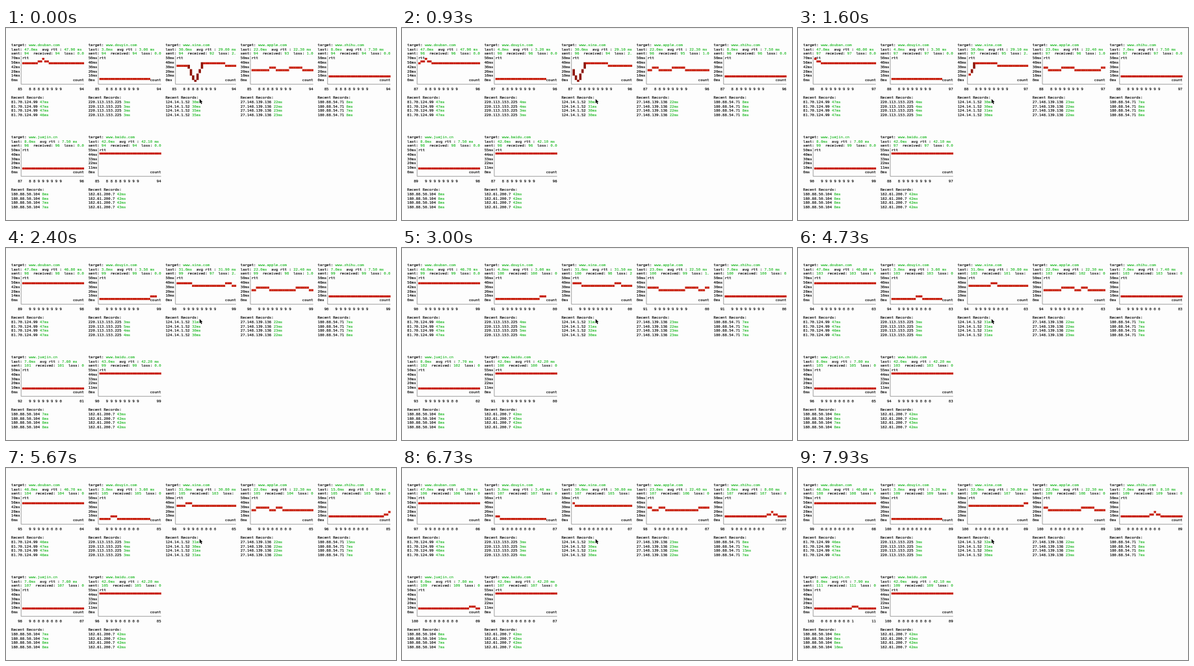
Write an HTML page with a canvas that moves like this. It is 600 px wide and 296 px high and loops after 8000 ms.

```html
<!DOCTYPE html>
<html lang="en">
<head>
<meta charset="utf-8">
<title>Ping dashboard</title>
<style>
  html, body { margin: 0; width: 100%; height: 100%; overflow: hidden; background: #fdfdfd; }
  canvas { display: block; width: 600px; height: 296px; }
</style>
</head>
<body>
<canvas id="screen"></canvas>
<script>
const LOOP = 8000, PERIOD = 550, POINTS = 10;
const CELL_W = 3.392, ROW_H = 6.76, LEFT = 8, TOP = 25.9;
const FONT_SIZE = CELL_W / 0.602;
const BAR_H = 3.2, BAR_SHIFT = 1.4;
const BLACK = '#161616', GREEN = '#2fbe35', RED = '#c8200f', DARK_RED = '#8e1408', AXIS = '#777';

// Each sample is rtt, sometimes plus jitter; bumps are { from, count, rtt }.
const bump = (from, count, rtt) => ({ from, count, rtt });
const targets = [
  { host: 'www.douban.com', ip: '81.70.124.99', col: 0, max: 70, phase: 0.45,
    rtt: 47, jitter: -1, bumps: [bump(88, 1, 59)] },
  { host: 'www.douyin.com', ip: '220.113.153.225', col: 35,
    rtt: 3, jitter: 1, bumps: [bump(98, 1, 5)] },
  { host: 'www.sina.com', ip: '124.14.1.52', col: 70, width: 27, lost: 2,
    rtt: 30, jitter: 1, bumps: [bump(88, 1, 0), bump(89, 4, 35), bump(98, 1, 32), bump(109, 1, 32)] },
  { host: 'www.apple.com', ip: '27.148.139.136', col: 104, lost: 1,
    rtt: 22, bumps: [bump(88, 1, 23), bump(91, 2, 23), bump(97, 2, 23), bump(100, 1, 23), bump(106, 2, 23)] },
  { host: 'www.zhihu.com', ip: '180.88.54.71', col: 139,
    rtt: 7, jitter: 1, bumps: [bump(105, 1, 15)] },
  { host: 'www.juejin.cn', ip: '180.88.50.104', col: 0, row: 21, start: 96,
    rtt: 8, jitter: -1, bumps: [bump(108, 1, 10)] },
  { host: 'www.baidu.com', ip: '182.61.200.7', col: 35, row: 21, max: 55,
    rtt: 42, jitter: 1 },
].map(t => ({ row: 0, max: 50, phase: 0.88, width: 28, lost: 0, start: 94, jitter: 0, bumps: [], ...t }));

const canvas = document.getElementById('screen');
const ctx = canvas.getContext('2d');
const ratio = window.devicePixelRatio || 1;
canvas.width = 600 * ratio;
canvas.height = 296 * ratio;

const cellX = col => LEFT + col * CELL_W;
const rowY = row => TOP + row * ROW_H;

function noise(n, seed) {
  const x = Math.sin(n * 12.9898 + (seed + 1) * 78.233) * 43758.5453;
  return x - Math.floor(x);
}

function sample(t, n) {
  const hit = t.bumps.find(b => n >= b.from && n < b.from + b.count);
  if (hit) return hit.rtt;
  return t.rtt + (noise(n, t.col + t.row) < 0.3 ? t.jitter : 0);
}

function text(col, row, string, color = BLACK) {
  ctx.save();
  ctx.translate(cellX(col), rowY(row) + 2.05);
  ctx.scale(0.1, 0.1);
  ctx.fillStyle = ctx.strokeStyle = color;
  ctx.lineWidth = 1.8;
  ctx.fillText(string, 0, 0);
  ctx.strokeText(string, 0, 0);
  ctx.restore();
}

// Labels and values alternate, and the line is cut at the panel edge.
function line(t, row, ...parts) {
  let used = 0;
  parts.forEach((part, i) => {
    const shown = String(part).slice(0, Math.max(0, t.width + 5 - used));
    text(t.col + used, t.row + row, shown, i % 2 ? GREEN : BLACK);
    used += shown.length;
  });
}

function drawAxes(t, first, last) {
  const right = t.col + 5 + t.width;
  for (let i = 0; i <= 5; i++) text(t.col, t.row + 3 + i, t.max / 5 * (5 - i) + 'ms');

  const x = cellX(t.col + 4.5), y = rowY(t.row + 9);
  ctx.strokeStyle = AXIS;
  ctx.lineWidth = 0.7;
  ctx.beginPath();
  ctx.moveTo(x, rowY(t.row + 2.5));
  ctx.lineTo(x, y);
  ctx.lineTo(cellX(right), y);
  ctx.stroke();

  text(t.col + 5, t.row + 3, 'rtt');
  text(right - 5, t.row + 8, 'count');

  const twoDigits = n => String(n % 100).padStart(2, '0');
  text(t.col + 5 - String(first).length, t.row + 10, String(first));
  for (let n = first + 1; n < last; n++) {
    text(t.col + 6 + 2 * (n - first), t.row + 10, twoDigits(n)[0]);
  }
  text(right - 2, t.row + 10, twoDigits(last));
}

// Levels count half rows downwards from the top of the plot.
function drawPlot(t, values) {
  const levels = values.map(v => v ? 10 - Math.floor(v * 11 / t.max) : 11);
  const levelY = level => rowY(t.row + 3 + Math.floor(level / 2)) + (level % 2 ? BAR_SHIFT : -BAR_SHIFT);
  const levelAt = cell => {
    const inside = Math.min(t.width - 1, Math.max(0, cell));
    const position = (inside + 28 - t.width) / 3;
    const i = Math.min(POINTS - 2, Math.floor(position));
    return Math.round(levels[i] + (levels[i + 1] - levels[i]) * (position - i));
  };
  for (let cell = 0; cell < t.width; cell++) {
    const level = levelAt(cell);
    if (level >= 10 && cell >= t.width - 5) continue;   // hidden by "count"
    const bottom = Math.max(level, levelAt(cell - 1) - 1, levelAt(cell + 1) - 1);
    ctx.fillStyle = bottom > level || level === 11 ? DARK_RED : RED;
    ctx.fillRect(cellX(t.col + 5 + cell), levelY(level) - BAR_H / 2,
                 CELL_W + 0.2, levelY(bottom) - levelY(level) + BAR_H);
  }
}

function drawPanel(t, time) {
  const last = t.start + Math.floor(time / PERIOD + t.phase);
  const first = last - POINTS + 1;
  const values = Array.from({ length: POINTS }, (_, i) => sample(t, first + i));
  const average = values.reduce((a, b) => a + b) / POINTS;

  line(t, 0, 'target: ', t.host);
  line(t, 1, 'last: ', values[POINTS - 1].toFixed(1) + 'ms', '  avg rtt : ', average.toFixed(2) + ' ms');
  line(t, 2, 'sent: ', last, '  received: ', last - t.lost,
       '  loss: ', (100 * t.lost / last).toFixed(2) + '%');
  drawAxes(t, first, last);
  drawPlot(t, values);
  line(t, 12, 'Recent Records:');
  for (let i = 0; i < 4; i++) line(t, 13 + i, t.ip + ' ', values[POINTS - 1 - i] + 'ms');
}

const pointer = new Path2D('M297.8 109.5V116L299.3 114.7L300.4 117.2L301.6 116.7L300.5 114.3H302.5Z');

function draw(now) {
  const time = now % LOOP;
  ctx.setTransform(ratio, 0, 0, ratio, 0, 0);
  ctx.fillStyle = '#fdfdfd';
  ctx.fillRect(0, 0, 600, 296);
  ctx.fillStyle = '#eeeeee';
  ctx.fillRect(0, 0, 600, 1);

  ctx.font = `${FONT_SIZE * 10}px "DejaVu Sans Mono", monospace`;
  ctx.textBaseline = 'alphabetic';
  ctx.lineJoin = 'round';
  targets.forEach(t => drawPanel(t, time));

  ctx.strokeStyle = '#fff';
  ctx.lineWidth = 1;
  ctx.stroke(pointer);
  ctx.fillStyle = '#000';
  ctx.fill(pointer);
  requestAnimationFrame(draw);
}
requestAnimationFrame(draw);
</script>
</body>
</html>
```
